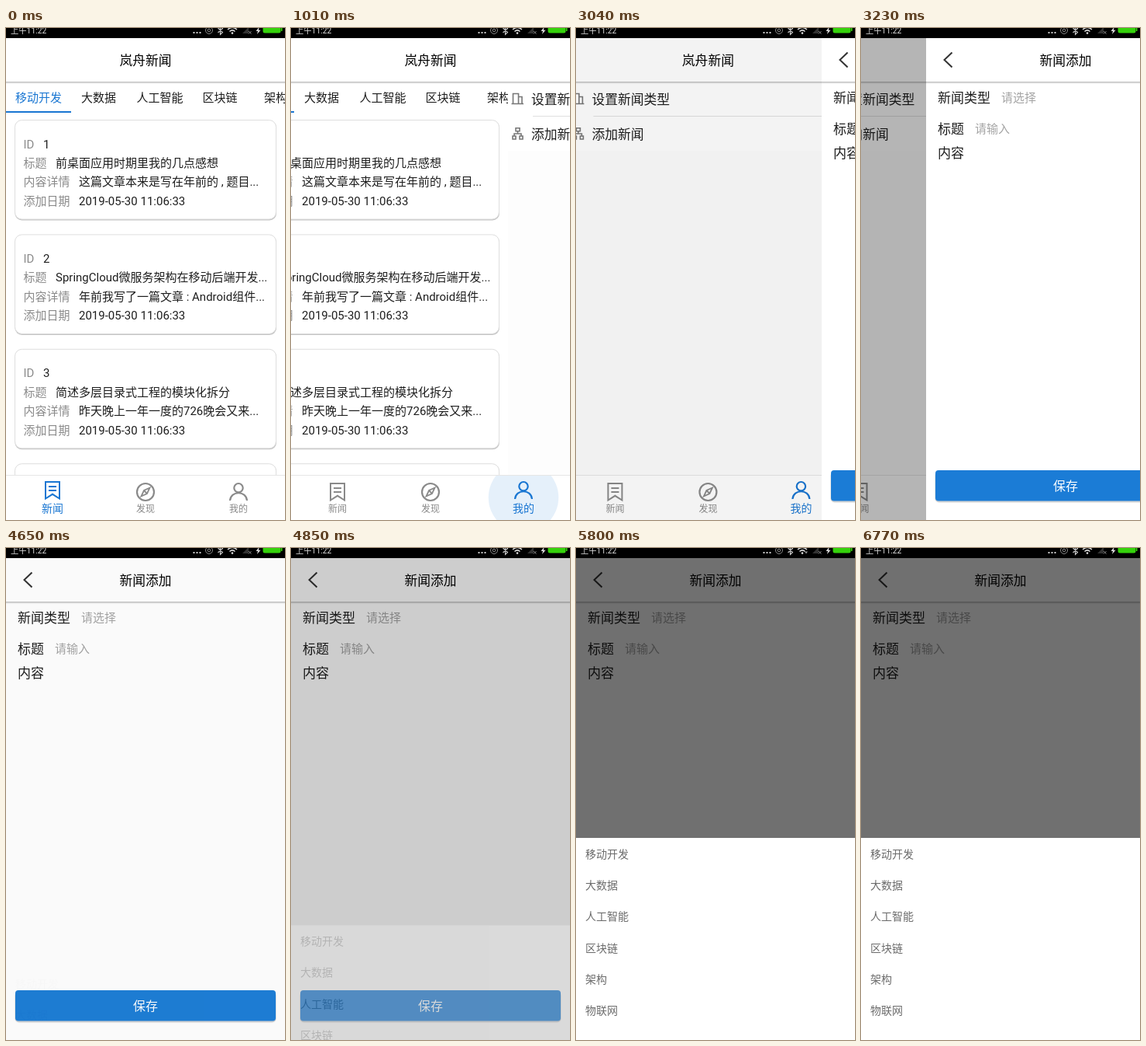
An HTML page that plays this animation: 360x633 px, repeating every 8 s.

```html
<!DOCTYPE html>
<html lang="zh-CN">
<head>
<meta charset="utf-8">
<title>News app</title>
<style>
html, body { margin: 0; width: 100%; height: 100%; overflow: hidden; background: #fff; }
svg { display: block; width: 360px; height: 633px; }
text { font-family: Roboto, "Noto Sans CJK SC", "Noto Sans CJK", sans-serif; white-space: pre; }
</style>
</head>
<body>
<svg id="stage" viewBox="0 0 360 633" xmlns="http://www.w3.org/2000/svg"></svg>
<script>
const LOOP = 8000;
const BLUE = '#1976d2', GREY = '#8a8a8a', INK = '#1e1e1e';
const TOPICS = ['移动开发', '大数据', '人工智能', '区块链', '架构', '物联网'];
const NEWS = [
  ['前桌面应用时期里我的几点感想', '这篇文章本来是写在年前的 , 题目...'],
  ['SpringCloud微服务架构在移动后端开发...', '年前我写了一篇文章 : Android组件...'],
  ['简述多层目录式工程的模块化拆分', '昨天晚上一年一度的726晚会又来...'],
  ['', '']
];

// Text placed by the vertical middle of its glyphs
const text = (x, mid, size, fill, str, more = '') =>
  `<text x="${x}" y="${(mid + size * 0.37).toFixed(2)}" font-size="${size}" fill="${fill}" ${more}>${str}</text>`;
const rect = (x, y, w, h, fill, more = '') =>
  `<rect x="${x}" y="${y}" width="${w}" height="${h}" fill="${fill}" ${more}/>`;
const line = (d, color, width, more = '') =>
  `<path d="${d}" fill="none" stroke="${color}" stroke-width="${width}" ${more}/>`;
const MIDDLE = 'text-anchor="middle"';

const header = title =>
  rect(0, 13, 360, 56, '#fff') + rect(0, 69, 360, 1, '#c2c2c2') +
  rect(0, 70, 360, 1, '#dedede') + rect(0, 71, 360, 1, '#f4f4f4') +
  text(180, 42, 16.8, '#000', title, MIDDLE + ' font-weight="500"');

function card([title, body], i) {
  const top = 118 + i * 147.4;
  const rows = [['ID', 48, i + 1], ['标题', 64, title], ['内容详情', 94, body], ['添加日期', 94, '2019-05-30 11:06:33']];
  return rect(11.5, top + 1.5, 337.5, 128, '#c4c4c4', 'rx="9"') +
    rect(11.5, top + 0.5, 337, 127.5, '#fff', 'rx="9" stroke="#dedede"') +
    rows.map(([label, x, value], r) => {
      const mid = top + 31 + r * 24.4;
      return text(22.5, mid, 15, GREY, label) + text(x, mid, 15, INK, value);
    }).join('');
}

function newsPage() {
  const xs = [12, 97, 168.5, 253.5, 333];
  return rect(0, 70, 360, 506, '#fff') + NEWS.map(card).join('') +
    xs.map((x, i) => text(x, 89.5, 15, i ? INK : BLUE, TOPICS[i])).join('') +
    rect(0, 107, 84, 2, BLUE);
}

function minePage() {
  const building = line('M4.5 97.5H20 M6.5 97V84.5H13.5V97 M13.5 88.5H18V97', '#777', 1.6);
  const tree = line('M10 128.8h5v4h-5z M6 139h4v4h-4z M15 139h4v4h-4z M12.5 133v3 M8 139v-3h9v3', '#777', 1.6);
  return rect(0, 70, 360, 506, '#fdfdfd') + rect(0, 70, 360, 88, '#fff') + building + tree +
    text(30, 92, 16.8, INK, '设置新闻类型') + text(30, 137, 16.8, INK, '添加新闻') +
    rect(32, 113, 328, 1, '#e0e0e0');
}

const ICONS = [
  line('M-9-11H9V10.5L0 4.8L-9 10.5Z M-5-5H5 M-5 0H5', 'currentColor', 2),
  '<circle r="11" fill="none" stroke="currentColor" stroke-width="2.2"/>' +
    line('M5.5-5.5L2 2L-5.5 5.5L-2-2Z M-2-2L2 2', 'currentColor', 1.8),
  '<circle cy="-5.3" r="5.7" fill="none" stroke="currentColor" stroke-width="2.2"/>' +
    line('M-11 11C-10-2 10-2 11 11', 'currentColor', 2.2)
];
const navItem = (label, i) =>
  `<g class="nav"><g>${ICONS[i]}</g><text x="${60 + i * 120}" ${MIDDLE} fill="currentColor">${label}</text></g>`;

function formPage() {
  return rect(0, 13, 360, 620, '#fff') + header('新闻添加') +
    line('M33.5 31.5L23.5 41L33.5 50.5', '#333', 2) +
    text(15, 89.5, 17, INK, '新闻类型') + text(97, 89.5, 15, '#a4a4a4', '请选择') +
    text(15, 129.5, 17, INK, '标题') + text(63, 129.5, 15, '#a4a4a4', '请输入') +
    text(15, 161, 17, INK, '内容') +
    rect(11.5, 571, 337, 39.5, '#d4d4d4', 'rx="5"') + rect(12, 569, 336, 39.5, '#1b7cd6', 'rx="4"') +
    text(180, 589, 16, '#fff', '保存', MIDDLE);
}

const sheetList = () => rect(0, 373, 360, 300, '#fff') +
  TOPICS.map((s, i) => text(12, 393.5 + i * 40.35, 14, '#6c6c6c', s)).join('');

function statusBar() {
  const dots = [242.5, 246.5, 250.5].map(x => rect(x - 1, 5, 2, 2, '#ccc')).join('');
  return rect(0, 0, 360, 13, '#000') +
    '<text x="6" y="7" font-size="10.3" fill="#ddd">上午11:22</text>' + dots +
    '<circle cx="262" cy="3" r="4.5" fill="none" stroke="#888"/><circle cx="262" cy="3" r="1.8" fill="none" stroke="#888"/>' +
    line('M273.5 0L279.5 5.5L276.5 8.5V-2L279.5 0.5L273.5 6', '#ccc', 1.1) +
    line('M286 2Q292-3 298 2 M288.5 4.5Q292 1.2 295.5 4.5', '#ddd', 1.5) + '<circle cx="292" cy="6.6" r="1.3" fill="#ddd"/>' +
    '<path id="blip" d="M295 4.5h4l-2 3z" fill="#999"/>' +
    '<path d="M305 7L313-1V7Z" fill="#333"/>' + line('M313 4l3.5 3.5M316.5 4l-3.5 3.5', '#888', 1) +
    '<path d="M326.5-1L322.5 4H325L324 8L328.5 2.8H326Z" fill="#ddd"/>' +
    rect(331.5, -4, 23, 10.5, '#35d20c', 'rx="2.5"') + rect(355, 0, 1.5, 4, '#35d20c');
}

document.getElementById('stage').innerHTML =
  `<defs><clipPath id="barClip">${rect(0, 576, 360, 57, '#fff')}</clipPath></defs>` +
  rect(0, 0, 360, 633, '#fff') +
  `<g id="home"><g id="news">${newsPage()}</g><g id="mine">${minePage()}</g>` +
  rect(0, 575, 360, 58, '#fff') + rect(0, 575, 360, 1, '#e6e6e6') +
  '<g clip-path="url(#barClip)"><circle id="ripple" cx="300" cy="604" fill="#1976d2"/></g>' +
  ['新闻', '发现', '我的'].map(navItem).join('') + header('岚舟新闻') + '</g>' +
  rect(0, 13, 360, 620, '#000', 'id="shade"') +
  `<g id="form">${formPage()}</g>` +
  rect(0, 13, 360, 620, '#000', 'id="scrim"') +
  `<g id="sheet">${sheetList()}</g>` + statusBar();

const el = id => document.getElementById(id);
const [home, news, mine, ripple, shade, form, scrim, sheet, blip] =
  ['home', 'news', 'mine', 'ripple', 'shade', 'form', 'scrim', 'sheet', 'blip'].map(el);
const navs = [...document.querySelectorAll('.nav')];

const clamp = v => Math.max(0, Math.min(1, v));
const smooth = (t, from, to) => {
  const u = clamp((t - from) / (to - from));
  return u * u * (3 - 2 * u);
};
const move = (node, x, y = 0) => node.setAttribute('transform', `translate(${x.toFixed(2)} ${y.toFixed(2)})`);
const show = (node, on) => node.setAttribute('visibility', on ? 'visible' : 'hidden');

// The screen refreshes only at these moments, on a 10 ms grid: [first, last, count]
const TICKS = [[0, 0, 1], [810, 1550, 9], [1650, 1650, 1], [3040, 3320, 4], [3530, 3530, 1],
  [4650, 5000, 5], [5210, 5210, 1], [5800, 5800, 1], [6770, 6770, 1]]
  .flatMap(([a, b, n]) => Array.from({ length: n }, (_, i) =>
    n > 1 ? Math.ceil((a + (b - a) * i / (n - 1)) / 10) * 10 : a));
const hold = t => TICKS.reduce((last, tick) => tick <= t + 0.5 ? tick : last, 0);

function setTab(active) {
  navs.forEach((nav, i) => {
    const on = i === active, label = nav.lastChild;
    nav.setAttribute('color', on ? BLUE : GREY);
    move(nav.firstChild, 60 + i * 120, on ? 595 : 597);
    label.setAttribute('font-size', on ? 14 : 12);
    label.setAttribute('y', on ? 623.2 : 623.4);
  });
}

function draw(time) {
  const t = hold(time);

  const swipe = smooth(t, 750, 1570);
  move(news, -360 * swipe);
  move(mine, 360 * (1 - swipe));
  show(news, swipe < 1);
  show(mine, swipe > 0);
  setTab(t < 810 ? 0 : 2);
  ripple.setAttribute('r', 15 + 55 * clamp((t - 780) / 400));
  ripple.setAttribute('opacity', t < 810 ? 0 : 0.11 * clamp((1650 - t) / 500));

  const push = smooth(t, 2953, 3356);
  move(home, -80 * push);
  move(form, Math.round(360 * (1 - push)));
  show(form, push > 0);
  shade.setAttribute('opacity', 0.38 * push);

  const rise = smooth(t, 4582, 5204);
  scrim.setAttribute('opacity', 0.56 * rise);
  sheet.setAttribute('opacity', rise ** 1.3);
  move(sheet, 0, 173 * (1 - rise));
  show(sheet, rise > 0);

  show(blip, t >= 5800 && t < 6770);
}

const start = performance.now();
function loop() {
  draw((performance.now() - start) % LOOP);
  requestAnimationFrame(loop);
}
loop();
</script>
</body>
</html>
```
